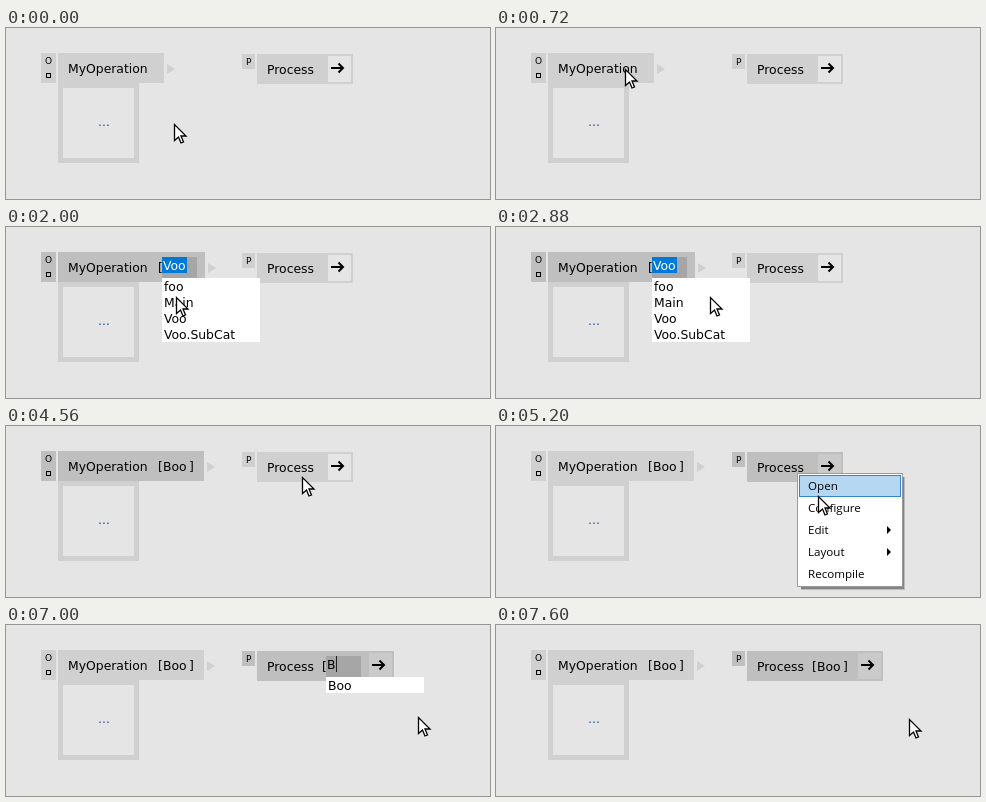
Recreate the animation shown at these times as an HTML page with a canvas. Size 484 px wide and 171 px high, loop 8920 ms.

```html
<!DOCTYPE html>
<html lang="en">
<head>
<meta charset="utf-8">
<title>Assigning a category to nodes</title>
<style>
  html, body { margin: 0; width: 100%; height: 100%; overflow: hidden; background: #e5e5e5; }
  canvas { display: block; }
</style>
</head>
<body>
<canvas id="stage" width="484" height="171"></canvas>
<script>
const ctx = document.getElementById('stage').getContext('2d');
const LOOP = 8920, STEP = 40, BLINK = 440;
const UI = '12.4px "DejaVu Sans", sans-serif';
const MENU = '11.6px "Open Sans", sans-serif';
const SMALL = '9px "DejaVu Sans", sans-serif';
const GRAY = '#d0d0d0', DARK = '#bfbfbf', PAPER = '#e5e5e5';

// Pointer travel: start, end, target x, target y, easing
const smooth = k => k * k * (3 - 2 * k);
const easeOut = k => 1 - (1 - k) ** 2;
const linear = k => k;
const moves = [
  [240, 720, 129, 41, smooth],
  [920, 1400, 152, 70, smooth],
  [1760, 2440, 214, 69, smooth],
  [2480, 2520, 214, 70, linear],
  [3960, 4000, 216, 72, linear],
  [4280, 4560, 296, 51, smooth],
  [4560, 4680, 301, 47, easeOut],
  [4960, 5200, 322, 70, smooth],
  [5200, 5360, 330, 83, easeOut],
  [5720, 6120, 361, 46, smooth],
  [6240, 6560, 412, 92, smooth],
  [7320, 7440, 413, 93, linear],
  [7560, 7600, 413, 94, linear],
];

const categories = ['foo', 'Main', 'Voo', 'Voo.SubCat'];
const operation = {
  name: 'MyOperation', x: 52, y: 25, width: 106, textX: 62, editX: 156,
  menuAt: 880, editAt: 1560, keys: [3160, 3360, 3440], done: 3760,
  deselect: 4840, options: categories,
};
const process = {
  name: 'Process', x: 251, y: 26, width: 96, textX: 261, editX: 320,
  menuAt: 4840, editAt: 5520, keys: [7000, 7080, 7120], done: 7320,
  deselect: LOOP, options: ['Boo', ...categories],
};

const within = (t, a, b) => t >= a && t < b;

function rect(x, y, w, h, color) {
  ctx.fillStyle = color;
  ctx.fillRect(x, y, w, h);
}

function text(str, x, y, font = UI, color = '#000') {
  ctx.font = font;
  ctx.fillStyle = color;
  ctx.fillText(str, x, y);
}

function poly(points, fill, stroke) {
  ctx.beginPath();
  points.forEach(([x, y]) => ctx.lineTo(x, y));
  ctx.closePath();
  ctx.fillStyle = fill;
  ctx.fill();
  if (stroke) {
    ctx.strokeStyle = stroke;
    ctx.lineWidth = 1.3;
    ctx.stroke();
  }
}

function pointerAt(t) {
  let x = 168, y = 96;
  for (const [start, end, tx, ty, ease] of moves) {
    if (t <= start) break;
    const k = ease(Math.min(1, (t - start) / (end - start)));
    x += (tx - x) * k;
    y += (ty - y) * k;
  }
  return [Math.round(x), Math.round(y)];
}

function drawHeader(node, t) {
  const selected = within(t, node.menuAt, node.deselect);
  const growth = t < node.editAt ? 0 : t < node.done ? 41 : 40;
  const color = selected ? DARK : GRAY;
  rect(node.x, node.y, node.width + growth, 30, color);
  text(node.name, node.textX, node.y + 20);
  if (growth) text('[', node.editX - 4, node.y + 20);
  if (t >= node.done) {
    text('Boo', node.editX + 1, node.y + 20);
    text(']', node.editX + 27, node.y + 20);
  }
  return { right: node.x + node.width + growth, color, selected };
}

function drawOperation(t) {
  const { right, color } = drawHeader(operation, t);
  rect(35, 25, 15, 30, color);
  text('O', 39, 36, SMALL);
  ctx.strokeStyle = '#000';
  ctx.lineWidth = 1;
  ctx.strokeRect(40.5, 45.5, 4, 4);
  rect(52, 55, 81, 80, GRAY);
  rect(57, 60, 71, 70, PAPER);
  text('...', 92, 98, UI, '#1f55a5');
  poly([[right + 3, 36], [right + 11, 41], [right + 3, 46]], GRAY);
}

function drawProcess(t) {
  const { right, color, selected } = drawHeader(process, t);
  rect(236, 26, 13, 15, color);
  text('P', 240, 37, SMALL);
  rect(right - 25, 28, 23, 26, selected ? '#cacaca' : PAPER);
  const x = right - 22;
  rect(x, 39, 12, 2, '#000');
  ctx.strokeStyle = '#000';
  ctx.lineWidth = 2;
  ctx.beginPath();
  ctx.moveTo(x + 7.5, 35.5);
  ctx.lineTo(x + 12, 40);
  ctx.lineTo(x + 7.5, 44.5);
  ctx.stroke();
}

function drawMenu(node, t, [px, py]) {
  if (!within(t, node.menuAt, node.editAt)) return;
  const [x, y] = node === operation ? [129, 41] : [301, 47];
  rect(x + 4, y + 4, 104, 113, 'rgba(0,0,0,.18)');
  rect(x + 4, y + 4, 103, 112, 'rgba(0,0,0,.3)');
  rect(x, y, 106, 114, '#9a9a9a');
  rect(x + 1, y + 1, 104, 112, '#fff');
  const hovered = Math.floor((py - y - 2) / 22);
  ['Open', 'Configure', 'Edit', 'Layout', 'Recompile'].forEach((label, i) => {
    const top = y + 2 + i * 22;
    if (i === hovered) {
      rect(x + 2, top, 102, 22, '#2f86cf');
      rect(x + 3, top + 1, 100, 20, '#b5d7f1');
    }
    text(label, x + 11, top + 15, MENU);
    if (label === 'Edit' || label === 'Layout') {
      poly([[x + 90, top + 7], [x + 94, top + 11], [x + 90, top + 15]], '#000');
    }
  });
}

function drawEditor(node, t) {
  if (!within(t, node.editAt, node.done)) return;
  const x = node.editX, y = node.y + 5;
  const typed = 'Boo'.slice(0, node.keys.filter(k => t >= k).length);
  rect(x, y, 35, 21, '#a6a6a6');
  if (!typed) rect(x, y, 25, 16, '#0078d7');
  text(typed || 'Voo', x + 1, y + 13, UI, typed ? '#000' : '#fff');

  const lastKey = node.keys.filter(k => t >= k).pop() ?? node.editAt;
  if (Math.floor((t - lastKey) / BLINK) % 2 === 0) {
    const caret = typed ? Math.round(ctx.measureText(typed).width) + 1 : 25;
    rect(x + caret, y, 1, 16, '#222');
  }

  const options = node.options.filter(name => name.startsWith(typed));
  rect(x, y + 21, 98, options.length * 16, '#fff');
  options.forEach((name, i) => text(name, x + 2, y + 34 + i * 16));
}

function drawPointer([x, y]) {
  const shape = [[0, 0], [0, 16], [4, 12.5], [6.5, 18.5], [9, 17.5], [6.5, 11.5], [11.5, 11.5]];
  poly(shape.map(([dx, dy]) => [x + dx + .5, y + dy + .5]), '#fff', '#000');
}

function draw(now) {
  const t = Math.floor(now % LOOP / STEP) * STEP;
  const pointer = pointerAt(t);
  rect(0, 0, 484, 171, PAPER);
  drawOperation(t);
  drawProcess(t);
  for (const node of [operation, process]) {
    drawEditor(node, t);
    drawMenu(node, t, pointer);
  }
  drawPointer(pointer);
}

const start = performance.now();
function tick() {
  draw(performance.now() - start);
  requestAnimationFrame(tick);
}
tick();
</script>
</body>
</html>
```
